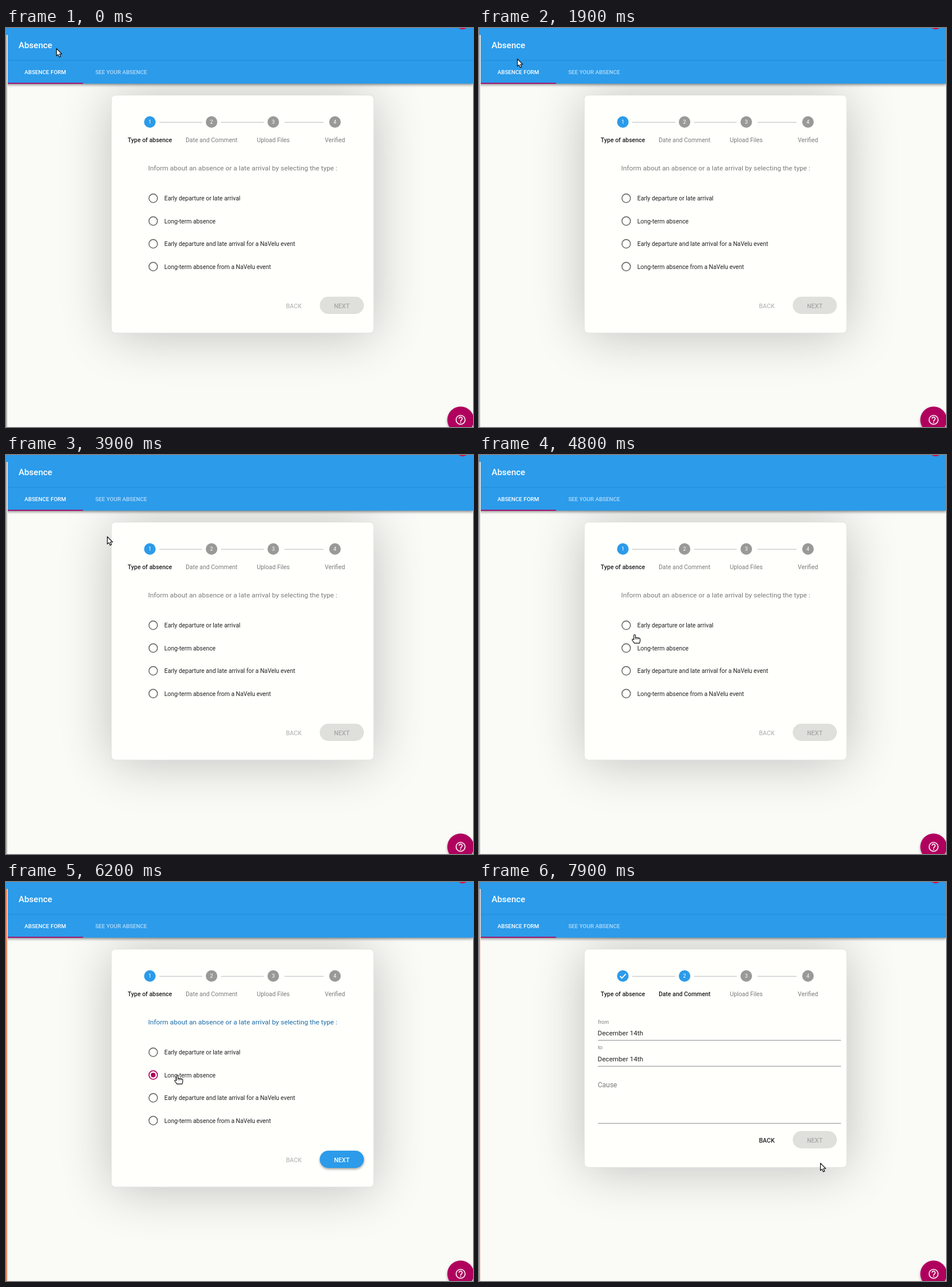
Animation of 809 by 692 pixels, one loop 8000 ms. Source, as an HTML page:

```html
<!DOCTYPE html>
<html lang="en">
<head>
<meta charset="utf-8">
<title>Absence form</title>
<style>
  html, body { margin: 0; width: 100%; height: 100%; overflow: hidden; background: #fafaf7; }
  svg { display: block; width: 809px; height: 692px; font-family: Roboto, Arial, sans-serif; }
  .mid { text-anchor: middle; }
  .medium { font-weight: 500; }
</style>
</head>
<body>
<svg viewBox="0 0 809 692" xmlns="http://www.w3.org/2000/svg">
  <defs>
    <filter id="glow" x="-60%" y="-60%" width="220%" height="220%"><feGaussianBlur stdDeviation="46"/></filter>
    <filter id="soft" x="-20%" y="-50%" width="140%" height="220%"><feGaussianBlur stdDeviation="2"/></filter>
  </defs>
  <rect width="809" height="692" fill="#fafaf7"/>
  <rect id="cardShadow" x="183" y="120" width="454" fill="#000" opacity=".24" filter="url(#glow)"/>
  <rect id="card" x="182.5" y="116.5" width="454.5" rx="7" fill="#fffffc" stroke="#e2e2df"/>

  <g id="steps"></g>
  <g id="typePage"></g>
  <g id="datePage"></g>

  <text id="back" class="mid medium" x="498.500" font-size="10.6">BACK</text>
  <g id="next">
    <rect id="nextShadow" x="544" y="468" width="76" height="30" rx="15" fill="#000" filter="url(#soft)"/>
    <rect id="nextFace" x="543.500" y="466" width="76.500" height="30" rx="15"/>
    <text id="nextText" class="mid medium" x="581.700" y="485.500" font-size="10.7">NEXT</text>
  </g>

  <rect x="0" y="88" width="809" height="11" fill="#000" opacity=".4" filter="url(#soft)"/>
  <rect width="809" height="96.500" fill="#2b9bea"/>
  <rect y="55.500" width="809" height="1.500" fill="#2690dc"/>
  <circle cx="791" cy="-8" r="10.500" fill="#d3123f"/>
  <text class="medium" x="21.700" y="35.300" font-size="15" fill="#fff">Absence</text>
  <text class="medium" x="32" y="80.300" font-size="9.75" fill="#fff">ABSENCE FORM</text>
  <text class="medium" x="154.700" y="80.300" font-size="9.75" fill="#b5dbf7">SEE YOUR ABSENCE</text>
  <rect x="3" y="95" width="130.500" height="1.700" fill="#b0005e"/>
  <rect y="12" width="3" height="680" fill="#f5f5f3"/>
  <rect id="edge" y="12" width="2" height="680"/>

  <circle cx="787.500" cy="682" r="23" fill="#000" opacity=".35" filter="url(#soft)"/>
  <circle cx="787.500" cy="679.500" r="23" fill="#b0005e"/>
  <g fill="none" stroke="#fff" stroke-width="1.600">
    <circle cx="787.500" cy="679.500" r="7.800"/>
    <path d="M784.800 677.500a2.700 2.700 0 1 1 4.600 1.900q-1.900 1.600-1.900 3"/>
  </g>
  <rect x="786.700" y="683.300" width="1.700" height="1.700" fill="#fff"/>

  <g id="pointer" fill="#fff" stroke="#111" stroke-width="1.200" stroke-linejoin="round">
    <path id="arrow" d="M.5 .7V13.400L3.300 10.900L5.400 15.600L7.800 14.500L5.700 10H9.700Z"/>
    <g id="hand">
      <path d="M-1.800 8.300V1Q-1.800-.5-.4-.5T1.100 1V5Q2.400 4 3.600 5.100Q5 4.300 6.200 5.500Q8.900 5 9.100 7.500V10.500Q8.900 12 8 14.400H-.8Q-2.500 12-4.500 9.500Q-5 7.600-3.700 7.300Q-2.600 7.100-1.800 8.300Z"/>
      <path d="M1.100 5V8M3.700 5.300V8M6.300 5.700V8" stroke-width=".8"/>
    </g>
  </g>
</svg>
<script>
const LOOP = 8000, TICK = 100;
const SELECT = 5500, HOVER = 7300, PRESS = 7400, ADVANCE = 7700;
const BLUE = '#2b9bea', PINK = '#b0005e', INK = '#212121', GREY = '#7b7b79';

// Pointer hotspot: time, x, y
const route = [
  [400, 87, 35], [600, 80, 20], [800, 58, 8], [1000, 35, 7], [1300, 21, 17],
  [1500, 24, 36], [1700, 44, 50], [1900, 66, 53], [2100, 88, 42], [2200, 91, 30],
  [2400, 95, 46], [2600, 90, 75], [2700, 90, 75], [2800, 89, 79], [3600, 89, 79],
  [3800, 120, 110], [4000, 230, 172], [4100, 262, 182], [4200, 262, 182],
  [4300, 261, 176], [4500, 257, 225], [4800, 270, 312], [5100, 259, 335],
  [5500, 257, 335], [6000, 268, 337], [6100, 268, 337], [6200, 297, 336],
  [6600, 379, 337], [6800, 379, 337], [7300, 570, 470], [7500, 592, 486], [7700, 591, 487]
];
const handTimes = [[2800, 3800], [4700, 6600], [7200, ADVANCE]];

const $ = id => document.getElementById(id);
const set = (node, attrs) => {
  for (const key in attrs) node.setAttribute(key, attrs[key]);
  return node;
};
function add(parent, tag, attrs, text = '') {
  const node = set(document.createElementNS('http://www.w3.org/2000/svg', tag), attrs);
  node.textContent = text;
  return parent.appendChild(node);
}
const show = (node, on) => node.setAttribute('visibility', on ? 'visible' : 'hidden');

const steps = ['Type of absence', 'Date and Comment', 'Upload Files', 'Verified'].map((name, i) => {
  const x = 249.2 + i * 106.9;
  return {
    dot: add($('steps'), 'circle', { cx: x, cy: 163, r: 10 }),
    digit: add($('steps'), 'text', { x, y: 166.3, 'font-size': 9, fill: '#fff', class: 'mid' }, i + 1),
    label: add($('steps'), 'text', { x, y: 198, 'font-size': 10.45, class: 'mid' }, name)
  };
});
add($('steps'), 'path', { d: 'M265.500 163.500H340M372.500 163.500H446.500M482.500 163.500H550', stroke: '#bdbdbb' });
const check = add($('steps'), 'path', {
  d: 'M244.300 163.300L247.500 166.600L254.300 159.600', fill: 'none', stroke: '#fff', 'stroke-width': 1.8
});

const heading = add($('typePage'), 'text', { x: 246.3, y: 247.4, 'font-size': 11.8 },
  'Inform about an absence or a late arrival by selecting the type :');
const radios = [
  'Early departure or late arrival', 'Long-term absence',
  'Early departure and late arrival for a NaVelu event', 'Long-term absence from a NaVelu event'
].map((name, i) => {
  const y = 295.3 + i * 39.5;
  add($('typePage'), 'text', { x: 274.3, y: y + 3.9, 'font-size': 10.35, fill: INK }, name);
  return add($('typePage'), 'circle', { cx: 255, cy: y, r: 7.4, fill: 'none', stroke: '#6e6e6c', 'stroke-width': 1.6 });
});
const radioDot = add($('typePage'), 'circle', { cx: 255, cy: 334.8, r: 4.1, fill: PINK });

[['from', 245.5], ['to', 290]].forEach(([name, y]) => {
  add($('datePage'), 'text', { x: 206, y, 'font-size': 9, fill: GREY }, name);
  add($('datePage'), 'text', { x: 205.6, y: y + 20.7, 'font-size': 11.6, fill: INK }, 'December 14th');
});
add($('datePage'), 'text', { x: 205.7, y: 356, 'font-size': 12, fill: GREY }, 'Cause');
add($('datePage'), 'path', { d: 'M206 274.500H627M206 319.500H627M206 418.500H627', stroke: '#8f8f8d' });

const mix = (a, b, p) => `rgb(${a.map((v, i) => Math.round(v + (b[i] - v) * p))})`;

function pointerAt(t) {
  const i = route.findIndex(p => p[0] > t);
  if (i === 0) return route[0].slice(1);
  if (i < 0) return route[route.length - 1].slice(1);
  const [t0, x0, y0] = route[i - 1], [t1, x1, y1] = route[i];
  const p = (t - t0) / (t1 - t0);
  return [x0 + (x1 - x0) * p, y0 + (y1 - y0) * p];
}

function render(t) {
  const selected = t >= SELECT, dates = t >= ADVANCE;
  const height = dates ? 378 : 412;
  set($('card'), { height: height + .5 });
  set($('cardShadow'), { height });
  set($('edge'), { fill: selected ? '#ef8a62' : '#b9b9b7' });

  steps.forEach((step, i) => {
    const active = i <= (dates ? 1 : 0);
    set(step.dot, { fill: active ? BLUE : '#999997' });
    set(step.label, { fill: active ? INK : GREY, 'font-weight': active ? 500 : 400 });
  });
  show(steps[0].digit, !dates);
  show(check, dates);

  show($('typePage'), !dates);
  show($('datePage'), dates);
  show(radioDot, selected && !dates);
  set(radios[1], { stroke: selected ? PINK : '#6e6e6c' });
  set(heading, { fill: selected && t < PRESS ? '#1b6ca8' : GREY });

  // The button fades to its disabled look after the page change.
  const fade = dates ? Math.min(1, (t - ADVANCE) / 200) : selected ? 0 : 1;
  const face = t >= HOVER ? [27, 108, 168] : [43, 155, 234];
  set($('nextFace'), { fill: mix(face, [223, 223, 220], fade) });
  set($('nextText'), { fill: mix([255, 255, 255], [168, 168, 166], fade) });
  set($('nextShadow'), { opacity: .4 * (1 - fade) });
  set($('next'), { transform: `translate(0 ${dates ? -34 : 0})` });
  set($('back'), { y: dates ? 451.5 : 485.5, fill: dates ? INK : '#bcbcba' });

  const hand = handTimes.some(([from, to]) => t >= from && t < to);
  show($('hand'), hand);
  show($('arrow'), !hand);
  set($('pointer'), { transform: `translate(${pointerAt(t).map(Math.round)})` });
}

const start = performance.now();
function frame() {
  const t = (performance.now() - start) % LOOP;
  render(Math.floor(t / TICK) * TICK);
  requestAnimationFrame(frame);
}
frame();
</script>
</body>
</html>
```
